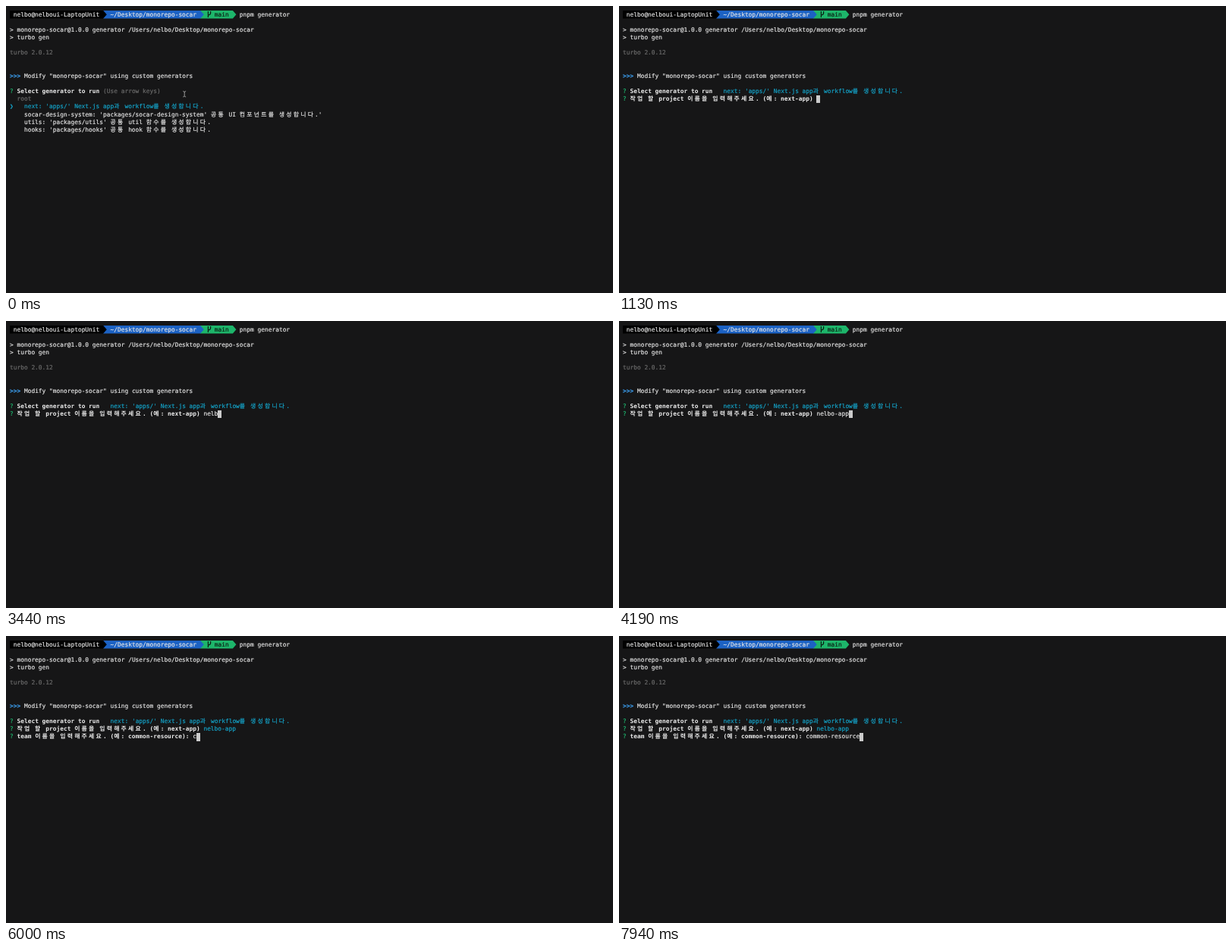
An HTML page for the animation above (8 s loop, 800 by 379 pixels).

```html
<!DOCTYPE html>
<html lang="ko">
<head>
<meta charset="utf-8">
<title>Generator terminal</title>
<style>
  html, body { margin: 0; width: 100%; height: 100%; overflow: hidden; background: #161617; }
  #stage {
    position: relative; width: 800px; height: 379px; overflow: hidden;
    font: 7.874px/10.15px "DejaVu Sans Mono", "Noto Sans CJK KR", "Noto Sans CJK", monospace;
    text-rendering: geometricPrecision; font-variant-ligatures: none; color: #e6e6e6;
    -webkit-text-stroke: .18px;
  }
  svg { position: absolute; left: 0; top: 0; }
  .row { position: absolute; left: 5px; height: 10.15px; white-space: pre; }
  .wide, .mark { display: inline-block; width: 2ch; }
  .mark { width: 1ch; }
  .bold { font-weight: 700; color: #ececec; -webkit-text-stroke: 0; }
  .dim { color: #6b6b6b; }
  .cyan { color: #14a5cb; }
  .green { color: #1fbd72; }
  .blue { color: #3b9bea; font-weight: 700; }
  .dark { color: #0c2015; }
  .block { display: inline-block; width: 1ch; height: 10.15px; background: #cbcbcb; vertical-align: top; }
</style>
</head>
<body>
<div id="stage">
  <svg width="800" height="379">
    <path fill="#1db56a" d="M256 6H298.9L303.4 11.2L298.9 16.4H256Z"/>
    <path fill="#1c62c4" d="M128 6H256.2L260.8 11.2L256.2 16.4H128Z"/>
    <path fill="#000" d="M5 6H128.2L132.8 11.2L128.2 16.4H5Z"/>
    <path fill="none" stroke="#0c2015" stroke-width="1.2" d="M266.4 7V15M269.6 7V9.5Q269.6 11.5 266.4 12.2"/>
    <path id="pointer" fill="none" stroke="#a8a8a8" stroke-width=".9"
      d="M233.3 112.6Q235 112.6 235.2 114Q235.4 112.6 237.1 112.6M235.2 114V118.6M233.3 120Q235 120 235.2 118.6Q235.4 120 237.1 120"/>
  </svg>
  <div id="header"></div>
  <div id="prompt"></div>
</div>
<script>
const LOOP = 8000, PITCH = 10.15, TOP = 6.6;
const SELECT_AT = 1000, SUBMIT_AT = 4310;
const range = (n, from, step) => Array.from({ length: n }, (_, i) => from + i * step);

const PROJECT = 'nelbo-app';
const PROJECT_KEYS = [...range(4, 3250, 62), ...range(5, 3560, 100)];
const TEAM = 'common-resource';
const TEAM_KEYS = range(TEAM.length, 5990, 120);

// Hangul takes two terminal cells.
const cells = text => text
  .replace(/[가-힣]/g, '<span class="wide">$&</span>')
  .replace('❯', '<span class="mark">❯</span>');
const span = (cls, text) => `<span class="${cls}">${cells(text)}</span>`;
const row = (line, html) =>
  `<div class="row" style="top:${(TOP + line * PITCH).toFixed(2)}px">${html}</div>`;
const question = text => span('green', '? ') + span('bold', text);
const cursor = '<span class="block"></span>';

const NEXT = "next: 'apps/' Next.js app과 workflow를 생성합니다.";

const header = [
  row(0, ' nelbo@nelboui-LaptopUnit   ~/Desktop/monorepo-socar     '
    + span('dark', 'main') + '   pnpm generator'),
  row(2, '&gt; monorepo-socar@1.0.0 generator /Users/nelbo/Desktop/monorepo-socar'),
  row(3, '&gt; turbo gen'),
  row(5, span('dim', 'turbo 2.0.12')),
  row(8, span('blue', '&gt;&gt;&gt;') + ' Modify "monorepo-socar" using custom generators')
];

const menu = [
  row(10, question('Select generator to run ') + span('dim', '(Use arrow keys)')),
  row(11, span('dim', '  root')),
  row(12, span('cyan', '❯   ' + NEXT)),
  ...[
    "socar-design-system: 'packages/socar-design-system' 공통 UI 컴포넌트를 생성합니다.'",
    "utils: 'packages/utils' 공통 util 함수를 생성합니다.",
    "hooks: 'packages/hooks' 공통 hook 함수를 생성합니다."
  ].map((item, i) => row(13 + i, '    ' + cells(item)))
].join('');

const typed = (text, keys, t) => text.slice(0, keys.filter(at => at <= t).length);

function promptAt(t) {
  if (t < SELECT_AT) return menu;
  const submitted = t >= SUBMIT_AT;
  const project = submitted ? span('cyan', PROJECT) : typed(PROJECT, PROJECT_KEYS, t) + cursor;
  const lines = [
    row(10, question('Select generator to run') + span('cyan', '   ' + NEXT)),
    row(11, question('작업 할 project 이름을 입력해주세요. (예: next-app) ') + project)
  ];
  if (submitted) {
    lines.push(row(12, question('team 이름을 입력해주세요. (예: common-resource): ')
      + typed(TEAM, TEAM_KEYS, t) + cursor));
  }
  return lines.join('');
}

const prompt = document.getElementById('prompt');
const pointer = document.getElementById('pointer');
document.getElementById('header').innerHTML = header.join('');

let shown = '';
function draw() {
  const t = performance.now() % LOOP;
  const html = promptAt(t);
  if (html !== shown) {
    prompt.innerHTML = shown = html;
    pointer.style.display = t < SELECT_AT ? '' : 'none';
  }
  requestAnimationFrame(draw);
}
draw();
</script>
</body>
</html>
```
